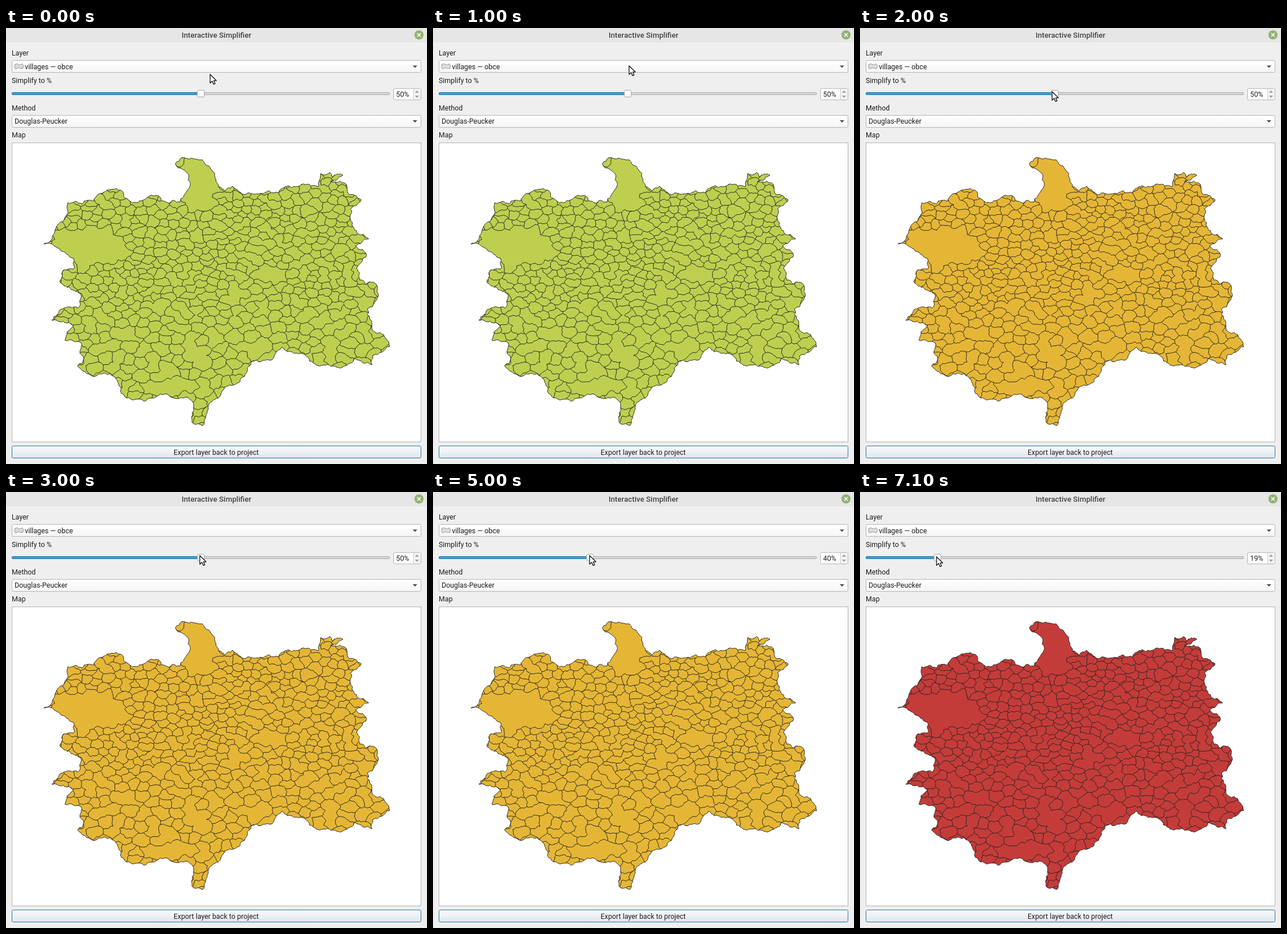
Write an HTML page that moves like this. It is 736 by 761 pixels and loops after 8 s.

```html
<!DOCTYPE html>
<html lang="en">
<head>
<meta charset="utf-8">
<title>Interactive Simplifier</title>
<style>
html, body { margin: 0; width: 100%; height: 100%; overflow: hidden; background: #efefef; }
svg { display: block; width: 736px; height: 761px; }
text { font: 12.3px Roboto, "Open Sans", sans-serif; fill: #1c1c1c; }
.title { font-size: 13.2px; font-weight: 500; fill: #444; }
.mid { text-anchor: middle; }
.box { fill: url(#soft); stroke: #b5b5b5; }
.arrow { fill: #484848; }
.groove { fill: #d6d6d6; stroke: #b0b0b0; }
.line { fill: none; stroke: #232323; stroke-width: .95; stroke-linejoin: round; }
</style>
</head>
<body>
<svg viewBox="0 0 736 761">
  <defs>
    <linearGradient id="soft" x2="0" y2="1"><stop stop-color="#fff"/><stop offset="1" stop-color="#f5f5f5"/></linearGradient>
    <linearGradient id="press" x2="0" y2="1"><stop stop-color="#fbfcfd"/><stop offset="1" stop-color="#dfe6ec"/></linearGradient>
    <clipPath id="land"><path id="landShape"/></clipPath>
  </defs>
  <rect width="736" height="761" fill="#efefef"/>
  <rect width="736" height="25" fill="#e6e6e6"/>
  <text class="title mid" x="368" y="17">Interactive Simplifier</text>
  <circle cx="722" cy="12" r="8" fill="#92b372"/>
  <path d="M719 9l6 6m0-6l-6 6" stroke="#fff" stroke-width="1.6"/>

  <text x="10" y="48">Layer</text>
  <text x="10" y="96">Simplify to %</text>
  <text x="10" y="144">Method</text>
  <text x="10" y="191">Map</text>

  <rect class="box" x="10.5" y="56.5" width="715" height="21" rx="2"/>
  <path d="M15.5 63.5l4-1 5 2 4-2 2 3-1 5-4 0-4-1-5 2-1.5-3z" fill="#dcdcdc" stroke="#999"/>
  <text x="33" y="72">villages — obce</text>
  <path class="arrow" d="M711 65.500h8l-4 4z"/>
  <g id="popup">
    <rect x="7" y="54" width="722" height="31" rx="4" fill="#000" opacity=".05"/>
    <rect x="9" y="56" width="718" height="27" rx="3" fill="#000" opacity=".09"/>
    <rect x="10.5" y="56.5" width="715" height="24" fill="#fbfbfb" stroke="#aaa"/>
    <text x="33" y="73">villages — obce</text>
  </g>

  <rect class="groove" x="10.5" y="112.5" width="660" height="4" rx="1.5"/>
  <rect id="done" x="10.5" y="112.5" height="4" rx="1.5" fill="#3ba0dd" stroke="#2876a8"/>
  <rect id="knob" y="108.5" width="12" height="12" rx="2.5" fill="url(#soft)" stroke="#a9a9a9"/>
  <rect x="677.5" y="105.5" width="48" height="20" rx="2" fill="#fff" stroke="#b5b5b5"/>
  <path d="M712 106h13v19h-13z" fill="#f3f3f3"/>
  <path d="M712.5 106v19" stroke="#cfcfcf"/>
  <path d="M715 113h7l-3.5-4zM715 118h7l-3.5 4z" fill="#a0a0a0"/>
  <text id="percent" x="682" y="120"></text>

  <rect class="box" x="10.5" y="152.5" width="715" height="21" rx="2"/>
  <text x="15" y="167">Douglas-Peucker</text>
  <path class="arrow" d="M711 161h8l-4 4z"/>

  <rect x="10.5" y="200.5" width="715" height="522" fill="#fff" stroke="#b4b4b4"/>
  <path id="fill"/>
  <path id="borders" class="line" clip-path="url(#land)"/>
  <path id="coast" class="line"/>

  <rect x="10.5" y="729.5" width="715" height="21" rx="2" fill="url(#press)" stroke="#2f72a0"/>
  <text class="mid" x="367.5" y="745">Export layer back to project</text>
  <path id="cursor" d="M.8 1V16L4.5 12.7 6.9 18.2 9.5 17.1 7.2 11.8H11.8Z" fill="#fff" stroke="#111" stroke-width="1.3" stroke-linejoin="round"/>
</svg>
<script>
const $ = id => document.getElementById(id);
let seed = 20;
const rand = () => (seed = (seed * 16807) % 2147483647) / 2147483647;

// Main corners of the coast, clockwise from the north.
const capes = `296,237 324,227 343,230 358,246 367,264 383,285 396,276 420,290 460,284
  477,288 493,275 546,277 550,254 566,252 570,260 589,257 568,268 596,277 601,291 621,300
  602,316 606,340 634,368 611,380 629,400 613,420 618,440 643,444 645,478 632,490 640,527
  660,535 671,556 641,572 640,588 610,577 574,590 528,575 482,557 430,582 420,602 381,630
  352,668 344,694 328,691 328,660 318,645 255,646 200,634 190,609 152,608 125,590 136,577
  131,549 103,545 118,520 80,510 126,489 131,465 94,442 100,423 120,418 118,402 66,377
  100,338 108,305 133,307 170,287 201,283 215,301 264,292 304,304 316,285 320,258`
  .split(/\s+/).map(p => p.split(",").map(Number));
// Ellipses that hold one large district each: centre and radii.
const towns = [[145, 382, 70, 36], [335, 270, 40, 52], [432, 556, 34, 18],
  [280, 628, 48, 17], [376, 544, 28, 16], [470, 432, 30, 16]];
const squash = 1.4; // districts are wider than tall

// Rough line from a to b, without its end point.
function rough([ax, ay], [bx, by], amp) {
  const dx = bx - ax, dy = by - ay;
  if (Math.hypot(dx, dy) < 5) return [[ax, ay]];
  const k = (rand() - .5) * amp;
  const mid = [(ax + bx) / 2 - dy * k, (ay + by) / 2 + dx * k];
  return [...rough([ax, ay], mid, amp), ...rough(mid, [bx, by], amp)];
}
const trace = pts => "M" + pts.map(p => p.map(v => v.toFixed(1)).join(" ")).join("L");

const makeCoast = () =>
  trace(capes.flatMap((p, i) => rough(p, capes[(i + 1) % capes.length], .42))) + "Z";

// Scattered district centres in stretched space, sparser in the south.
function scatter() {
  const sites = [];
  for (let n = 0; n < 7000; n++) {
    const x = 50 + rand() * 640, y = 210 + rand() * 500;
    const south = Math.min(1, Math.max(0, (y - 470) / 70));
    const gap = (11 + 6 * rand()) * (1 + .35 * south);
    if (sites.every(s => Math.hypot(x - s[0], y * squash - s[1]) > gap)) sites.push([x, y * squash]);
  }
  return sites;
}

// Voronoi cell: corners [x, y, neighbour across the side that starts here].
function cell(sites, i) {
  const [cx, cy] = sites[i];
  let poly = [[0, 200, -1], [736, 200, -1], [736, 1080, -1], [0, 1080, -1]];
  sites.forEach(([sx, sy], j) => {
    const dx = sx - cx, dy = sy - cy;
    if (j === i || dx * dx + dy * dy > 8100) return;
    const side = p => (p[0] - (cx + sx) / 2) * dx + (p[1] - (cy + sy) / 2) * dy;
    const next = [];
    poly.forEach((a, k) => {
      const b = poly[(k + 1) % poly.length], da = side(a), db = side(b);
      if (da <= 0) next.push(a);
      if (da <= 0 !== db <= 0) {
        const f = da / (da - db);
        next.push([a[0] + (b[0] - a[0]) * f, a[1] + (b[1] - a[1]) * f, da <= 0 ? j : a[2]]);
      }
    });
    poly = next;
  });
  return poly;
}

function makeBorders() {
  const sites = scatter(), cells = sites.map((_, i) => cell(sites, i));
  const townOf = ([x, y]) => towns.findIndex(([cx, cy, rx, ry]) =>
    Math.hypot((x - cx) / rx, (y / squash - cy) / ry) < 1);
  const group = sites.map((s, i) => townOf(s) < 0 ? i : -1 - townOf(s));
  // Some cells join a neighbour, which gives bent, uneven districts.
  cells.forEach((poly, i) => {
    const j = poly[Math.floor(rand() * poly.length)][2];
    if (rand() < .25 && group[i] === i && group[j] >= 0) group[i] = group[j];
  });
  const place = p => [p[0], p[1] / squash];
  let d = "";
  cells.forEach((poly, i) => poly.forEach((a, k) => {
    const j = a[2], b = place(poly[(k + 1) % poly.length]);
    if (j > i && group[i] !== group[j]) d += trace([...rough(place(a), b, .4), b]);
  }));
  return d;
}

const coast = makeCoast();
for (const id of ["landShape", "fill", "coast"]) $(id).setAttribute("d", coast);
$("borders").setAttribute("d", makeBorders());

// First step, last step, then pointer x, pointer y and percentage reached.
const moves = [
  [100, 200, 342, 65, 50], [1100, 1400, 326, 110, 50], [1600, 1600, 328, 110, 50],
  [1900, 2100, 337, 110, 50], [3000, 3000, 338, 110, 50], [3800, 3800, 339, 110, 50],
  [4800, 5300, 207, 110, 30], [5500, 5900, 133, 112, 19]
];

function pose(t) {
  const tick = Math.floor(t / 100) * 100;
  let now = [356, 80, 50];
  for (const [from, to, ...goal] of moves) {
    if (tick < from) break;
    const p = Math.min(1, (tick - from + 100) / (to - from + 100));
    const ease = p * p * (3 - 2 * p);
    now = now.map((v, i) => v + (goal[i] - v) * ease);
  }
  return now.map(Math.round);
}

function draw(ms) {
  const t = ms % 8000;
  const [x, y, value] = pose(t);
  const knob = Math.round(334 + (value - 50) * 6.61) + .5;
  $("cursor").setAttribute("transform", `translate(${x} ${y})`);
  $("knob").setAttribute("x", knob);
  $("done").setAttribute("width", knob - 6);
  $("percent").textContent = value + "%";
  $("popup").style.display = t >= 400 && t < 900 ? "" : "none";
  $("fill").setAttribute("fill", t < 2000 ? "#becf50" : t < 7100 ? "#e5b636" : "#c43c39");
}

const start = performance.now();
function frame() {
  draw(performance.now() - start);
  requestAnimationFrame(frame);
}
frame();
</script>
</body>
</html>
```
